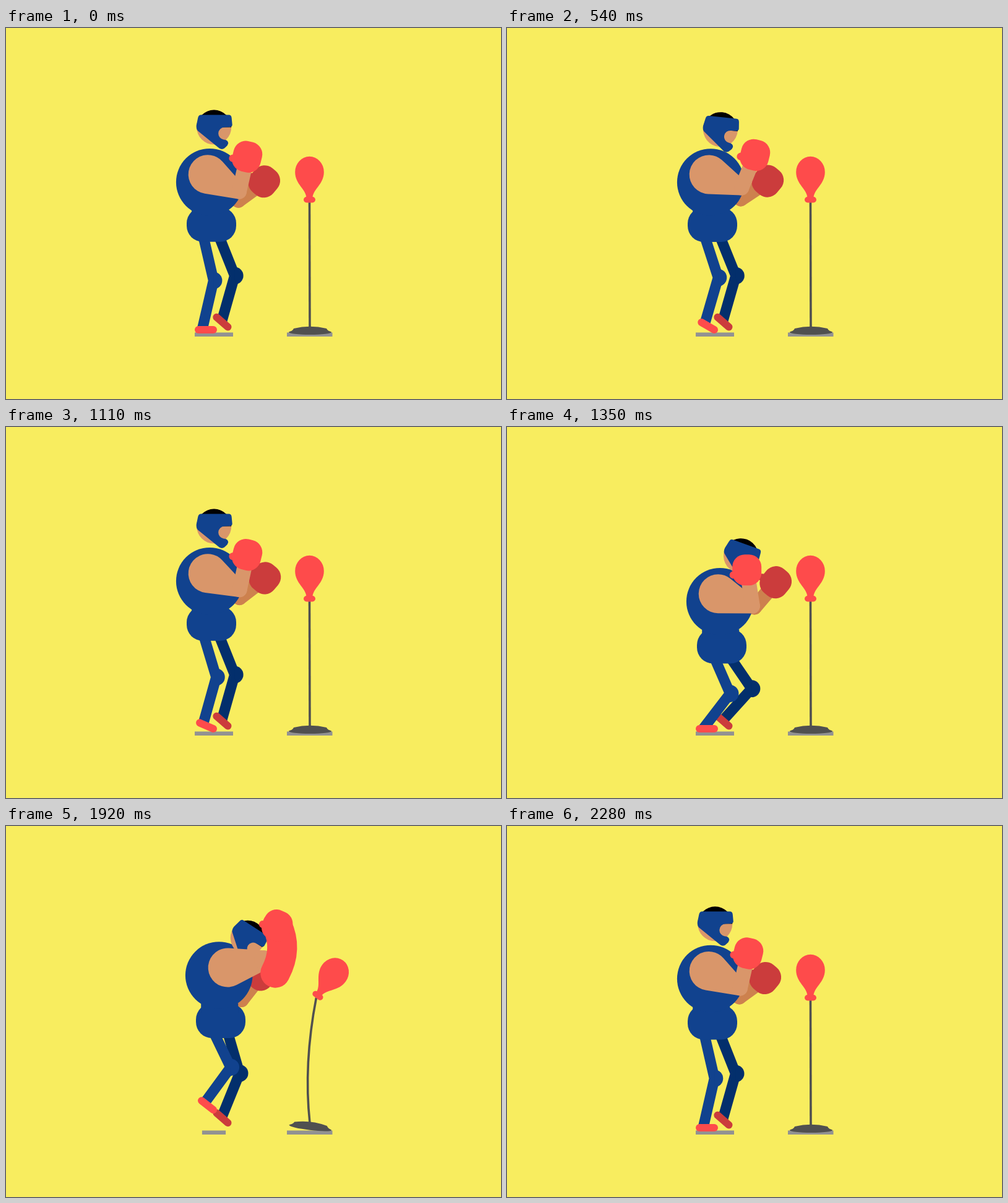
Recreate the animation shown at these times as an HTML page with a canvas. Size 800x600 px, loop 2.31 s.

```html
<!DOCTYPE html>
<html lang="en">
<head>
<meta charset="utf-8">
<title>Boxing practice</title>
<style>
html, body { margin: 0; width: 100%; height: 100%; overflow: hidden; background: #f8ed5f; }
canvas { display: block; }
</style>
</head>
<body>
<canvas id="stage" width="800" height="600"></canvas>
<script>
const ctx = document.getElementById('stage').getContext('2d');
const LOOP = 2310, STEP = 30;
const C = {
  bg: '#f8ed5f', blue: '#11428e', navy: '#032f6c', skin: '#d9966a', darkSkin: '#cd814e',
  red: '#fe4b4b', darkRed: '#cb3c3c', shadow: '#929292', iron: '#505050', black: '#000'
};

// Timing helpers
const clamp = u => Math.min(1, Math.max(0, u));
const ease = (t, a, b) => { const u = clamp((t - a) / (b - a)); return u * u * (3 - 2 * u); };
const pulse = (t, a, b, c, d) => ease(t, a, b) - ease(t, c, d);
const bump = (t, peak, reach) => pulse(t, peak - reach, peak, peak, peak + reach);

// Geometry helpers
const rad = deg => deg * Math.PI / 180;
const add = ([x, y], dx, dy) => [x + dx, y + dy];
const mix = ([x0, y0], [x1, y1], u) => [x0 + (x1 - x0) * u, y0 + (y1 - y0) * u];
const polar = (angle, r) => [Math.cos(angle) * r, Math.sin(angle) * r];
const dist = (a, b) => Math.hypot(b[0] - a[0], b[1] - a[1]);

// Middle joint of a rubbery limb: half the span plus the bend stays constant.
function joint(from, to, reach, side) {
  const span = dist(from, to), bend = Math.max(0, reach - span / 2);
  const [mx, my] = mix(from, to, 0.5), k = side * bend / span;
  return [mx - (to[1] - from[1]) * k, my + (to[0] - from[0]) * k];
}

// Drawing helpers
function fill(color, trace) {
  ctx.fillStyle = color;
  ctx.beginPath();
  trace();
  ctx.fill();
}
function stroke(color, width, cap, trace) {
  Object.assign(ctx, { strokeStyle: color, lineWidth: width, lineCap: cap });
  ctx.beginPath();
  trace();
  ctx.stroke();
}
function placed([x, y], deg, draw) {
  ctx.save();
  ctx.translate(x, y);
  ctx.rotate(rad(deg));
  draw();
  ctx.restore();
}
const disc = (color, [x, y], r) => fill(color, () => ctx.arc(x, y, r, 0, 7));
const box = (color, x, y, w, h, r) => fill(color, () => ctx.roundRect(x, y, w, h, r));

function taper(color, a, ra, b, rb) {
  const d = dist(a, b);
  if (d <= Math.abs(ra - rb)) return;
  const dir = Math.atan2(b[1] - a[1], b[0] - a[0]), open = Math.acos((ra - rb) / d);
  fill(color, () => {
    ctx.arc(...a, ra, dir + open, dir - open + 2 * Math.PI);
    ctx.arc(...b, rb, dir - open, dir + open);
  });
}

// Motion
const bob = t => t < 1140 ? 4.75 * (1 - Math.cos(2 * Math.PI * (t - 30) / 555)) : 0;
const hop = t => 29 * bump(t, 1920, 150);
const crouch = t => pulse(t, 1140, 1350, 1480, 1700);
const jab = t => pulse(t, 1490, 1590, 1620, 1740);
const rise = t => pulse(t, 1890, 1920, 1960, 2250);
const lean = t => 6 * pulse(t, 0, 400, 880, 1110) + 20 * ease(t, 1140, 1350)
  + 13 * ease(t, 1400, 1590) - 33 * ease(t, 1930, 2290);
const hips = t => [
  332 + 15 * pulse(t, 1140, 1350, 1920, 2280),
  317.5 + 37 * ease(t, 1140, 1350) - 9 * ease(t, 1400, 1590)
    - 30.5 * ease(t, 1620, 1900) + 2.5 * ease(t, 1920, 2200)
];
const chest = t => add(hips(t), -2.8, bob(t - 60) - 70.5 - lean(t) * 0.09);

function nearGlove(t) {
  const low = crouch(t);
  let p = [60.5 + 11 * bump(t, 540, 300) - 17 * low,
    -41 - 3 * bump(t, 540, 300) - 15 * bump(t, 870, 300) - 10 * low];
  p = mix(p, [113.5, -29], jab(t));
  p = mix(p, [91, -4], pulse(t, 1740, 1885, 1890, 1930));
  return add(chest(t), ...mix(p, [94, -80.5], rise(t)));
}
function farGlove(t) {
  let p = [88 + 5 * bump(t, 700, 600) + 2 * crouch(t) - 20 * rise(t),
    -1 - 11 * bump(t, 870, 400) - 30 * crouch(t)];
  p = mix(p, [75, -30], pulse(t, 1400, 1550, 1565, 1600));
  return add(chest(t), ...mix(p, [114, -21], pulse(t, 1560, 1590, 1620, 1740)));
}

// Degrees of swing after each punch.
function swing(t) {
  return [1577, 1877].reduce((sum, hit) => {
    const age = Math.max(0, t - hit);
    return sum + 61 * clamp(1 - age / 400) ** 2 * Math.sin(2 * Math.PI * age / 330);
  }, 0);
}

// Body parts
function leg(color, shoe, hip, toe, tilt, ankleAt) {
  const heel = add(toe, ...polar(rad(180 + tilt), 24));
  const ankle = mix(heel, toe, ankleAt), knee = joint(hip, ankle, 98, -1);
  const front = Math.atan2(ankle[1] - hip[1], ankle[0] - hip[0]) - Math.PI / 2;
  stroke(color, 17, 'butt', () => {
    ctx.moveTo(...hip);
    ctx.lineTo(...knee);
    ctx.lineTo(...ankle);
  });
  fill(color, () => ctx.arc(...knee, 14, front - Math.PI / 2, front + Math.PI / 2));
  stroke(shoe, 12, 'round', () => {
    ctx.moveTo(...heel);
    ctx.lineTo(...toe);
  });
}

// Motion blur of a fast glove, bowed up and to the right.
function trail(path, t) {
  const to = path(t), from = path(Math.max(0, t - STEP));
  if (dist(from, to) < 34) return null;
  const bow = add(mix(from, to, 0.5), Math.abs(to[1] - from[1]) / 4, -Math.abs(to[0] - from[0]) / 4);
  return { from, bow };
}

function glove(color, at, turn, smear) {
  if (smear) stroke(color, 48, 'round', () => {
    ctx.moveTo(...smear.from);
    ctx.quadraticCurveTo(...smear.bow, ...at);
  });
  placed(at, turn, () => {
    disc(color, [-22, 8], 6);
    box(color, -23.5, -25, 47, 50, 20);
  });
}

function head(at, turn) {
  placed(at, turn, () => {
    disc(C.skin, [0, 0], 28);
    fill(C.black, () => ctx.arc(0, 0, 28, Math.PI, 2 * Math.PI));
    fill(C.blue, () => {
      ctx.moveTo(-21, -20);
      ctx.lineTo(24, -20);
      ctx.quadraticCurveTo(28, -20, 28.5, -15);
      ctx.lineTo(29.5, -4);
      ctx.quadraticCurveTo(29.5, -1, 26, -0.5);
      ctx.lineTo(17, 0);
      ctx.arc(17, 10, 10, -Math.PI / 2, Math.PI * 0.55, true);
      ctx.quadraticCurveTo(23, 20.5, 23, 26);
      ctx.quadraticCurveTo(22, 30, 19, 32);
      ctx.quadraticCurveTo(13, 39, 6, 32);
      ctx.lineTo(-26, 6);
      ctx.quadraticCurveTo(-29, 3, -28.5, -3);
      ctx.lineTo(-26, -15);
      ctx.quadraticCurveTo(-25, -20, -21, -20);
    });
  });
}

function boxer(t) {
  const [hx, hy] = add(hips(t), 0, bob(t)), torso = chest(t), [tx, ty] = torso;
  const near = nearGlove(t), far = farGlove(t), tilt = lean(t);
  const half = 31 - hop(t) * 0.41;
  box(C.shadow, 336 - half, 492.5, half * 2, 6.5, 0);

  const farShoulder = add(torso, 4, 0), farElbow = joint(farShoulder, far, 72.5, 1);
  taper(C.darkSkin, farShoulder, 12, farElbow, 11.5);
  taper(C.darkSkin, farElbow, 11.5, far, 12);
  glove(C.darkRed, far, 40, trail(farGlove, t));

  const heelLift = 30 * bump(t, 540, 300) + 25 * bump(t, 1070, 280) + 38 * bump(t, 1920, 150);
  const farToe = [358.5, 483.5 + 4.5 * bump(t, 1590, 180) - hop(t) * 0.12];
  leg(C.navy, C.darkRed, [hx + 9, hy + 11], farToe, 41, 0.45);
  leg(C.blue, C.red, [hx - 15, hy + 11], [335, 488 - hop(t)], heelLift, 0.25);

  box(C.blue, hx - 40, hy - 28, 80, 56, 26);
  box(C.blue, tx - 29, ty + 45, 60, 16, 0);
  disc(C.blue, torso, 54.3);
  head(add(torso, ...polar(rad(tilt - 85.5), 89 - tilt * 0.38)), tilt);

  const shoulder = add(torso, -3 + 17 * pulse(t, 1740, 1900, 1950, 2200), -12.5);
  const elbow = joint(shoulder, near, 81, 1), smear = trail(nearGlove, t);
  const elbowSize = Math.max(12, 25 - (81 - dist(shoulder, near) / 2) / 3);
  taper(C.skin, shoulder, 31.5, elbow, elbowSize);
  taper(C.skin, elbow, elbowSize, smear ? smear.from : near, 12);
  glove(C.red, near, 14 - 14 * crouch(t) + 50 * jab(t) + 11 * rise(t), smear);
}

function bag(t) {
  const angle = swing(t), tilt = 7 * bump(t, 1920, 120);
  const collar = [490.5 + 13.5 * Math.sin(rad(angle * 2.8)), 278 - Math.abs(angle) * 0.1];
  const bend = 490.5 + 13 * Math.sin(rad(angle * 6.4));
  box(C.shadow, 454, 492.5, 73.5, 6.5, 0);
  placed([526, 492], tilt, () => {
    fill(C.iron, () => ctx.ellipse(-34.5, 0, 34.5, 4, 0, 0, 7));
    fill(C.iron, () => {
      ctx.moveTo(-69, 0);
      ctx.quadraticCurveTo(-63, -2, -61, -6);
      ctx.quadraticCurveTo(-34.5, -12.5, -8, -6);
      ctx.quadraticCurveTo(-6, -2, 0, 0);
    });
  });
  stroke(C.iron, 3.6, 'butt', () => {
    ctx.moveTo(491, 485 - tilt * 0.7);
    ctx.quadraticCurveTo(bend, 385, ...add(collar, ...polar(rad(angle + 90), 4)));
  });
  placed(collar, angle, () => {
    box(C.red, -9.5, -5, 19, 9.5, 4.7);
    fill(C.red, () => {
      ctx.moveTo(-5, -3);
      ctx.bezierCurveTo(-5, -17, -23.3, -25, -23.3, -45);
      ctx.ellipse(0, -45, 23.3, 25.2, 0, Math.PI, 2 * Math.PI);
      ctx.bezierCurveTo(23.3, -25, 5, -17, 5, -3);
    });
  });
}

function frame(now) {
  const t = Math.floor((now % LOOP) / STEP) * STEP;
  ctx.fillStyle = C.bg;
  ctx.fillRect(0, 0, 800, 600);
  bag(t);
  boxer(t);
  requestAnimationFrame(frame);
}
frame(0);
</script>
</body>
</html>
```
